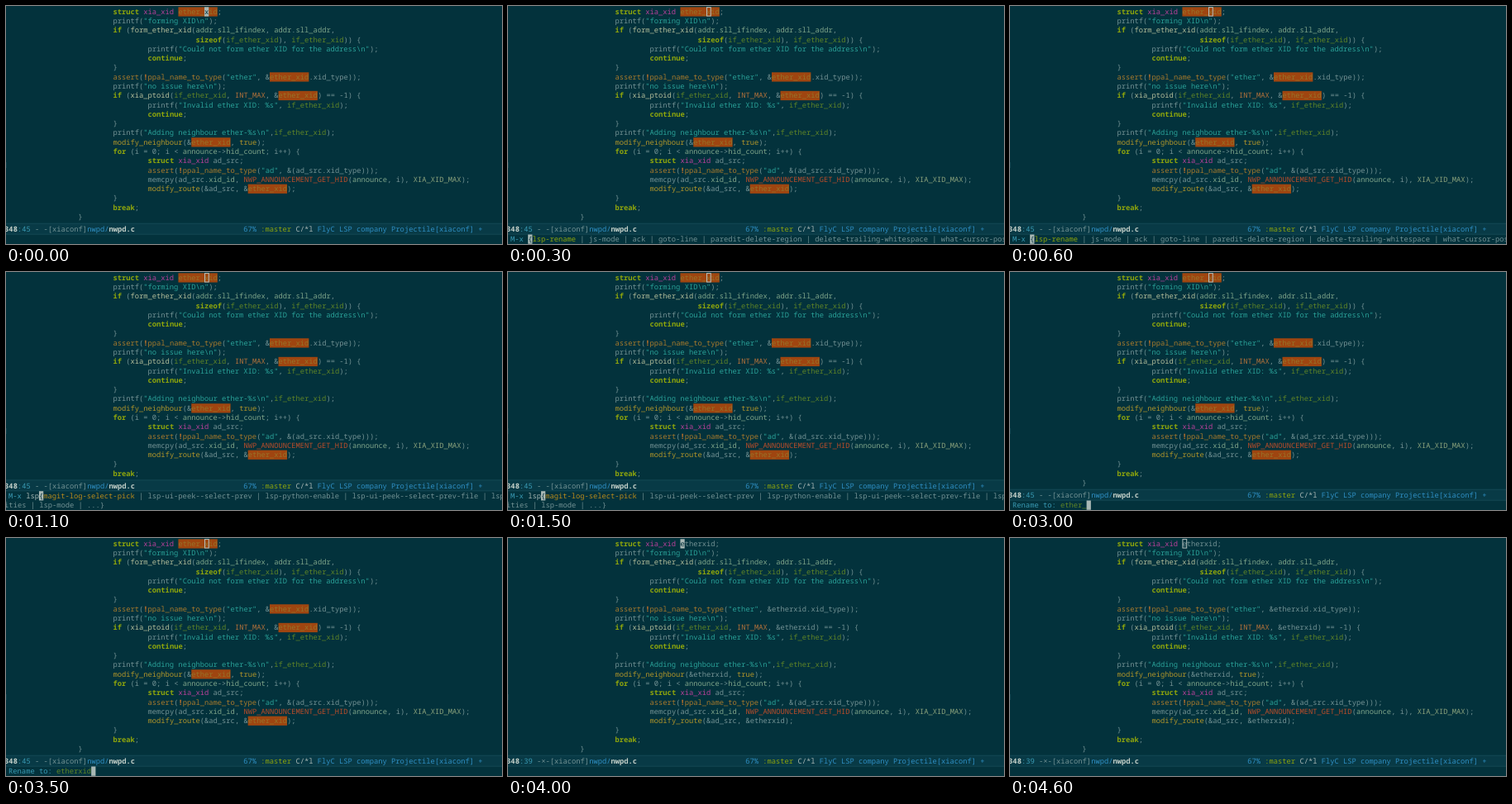
An HTML page for the animation above (4700 ms loop, 600 px wide and 288 px high).

```html
<!DOCTYPE html>
<html lang="en">
<head>
<meta charset="utf-8">
<title>Rename a symbol</title>
<style>
html, body { margin: 0; width: 100%; height: 100%; overflow: hidden; background: #03323c; }
svg { display: block; width: 600px; height: 288px; }
text {
  font: 8.77px "Noto Sans Mono", "DejaVu Sans Mono", monospace;
  text-rendering: geometricPrecision;
  white-space: pre;
  fill: #739294;
}
.key { fill: #8fa60c; font-weight: 700; }
.type { fill: #b8409a; }
.fn { fill: #b0952a; }
.check { fill: #a87a2c; }
.not { fill: #c8742a; font-weight: 700; }
.call { fill: #b4bd9a; }
.name { fill: #7fa58a; }
.str { fill: #2aa198; }
.arg { fill: #5f8427; }
.const { fill: #b3713a; }
.macro { fill: #bb4d2a; }
.limit { fill: #8ba27c; }
.mark { fill: #97742a; }
.hit { fill: #9f4510; }
.dark { fill: #03323c; }
.light { fill: #a9b8b5; }
.strong { fill: #c3cfc8; font-weight: 600; }
.blue { fill: #2f8fc4; }
.cyan { fill: #3a9bb4; }
.branch { fill: #8fa60c; }
.pick { fill: #b98a1c; }
.block { fill: #a9b8b5; }
.hollow { fill: none; stroke: #b5c2be; }
.bar { fill: #083a46; }
.rule { fill: #164a56; }
</style>
</head>
<body>
<svg id="stage" viewBox="0 0 600 288"></svg>
<script>
const CW = 5.265, LH = 11.28, LEFT = 3.1, EDGE = -1.9, TOP = 1.3, BASE = 8.5;
const LOOP = 4700;
const stage = document.getElementById("stage");

// Each entry: column, code
const code = [
  [24, "struct xia_xid ether_xid;"],
  [24, String.raw`printf("forming XID\n");`],
  [24, "if (form_ether_xid(addr.sll_ifindex, addr.sll_addr,"],
  [43, "sizeof(if_ether_xid), if_ether_xid)) {"],
  [32, String.raw`printf("Could not form ether XID for the address\n");`],
  [32, "continue;"],
  [24, "}"],
  [24, 'assert(!ppal_name_to_type("ether", &ether_xid.xid_type));'],
  [24, String.raw`printf("no issue here\n");`],
  [24, "if (xia_ptoid(if_ether_xid, INT_MAX, &ether_xid) == -1) {"],
  [32, 'printf("Invalid ether XID: %s", if_ether_xid);'],
  [32, "continue;"],
  [24, "}"],
  [24, String.raw`printf("Adding neighbour ether-%s\n",if_ether_xid);`],
  [24, "modify_neighbour(&ether_xid, true);"],
  [24, "for (i = 0; i < announce->hid_count; i++) {"],
  [32, "struct xia_xid ad_src;"],
  [32, 'assert(!ppal_name_to_type("ad", &(ad_src.xid_type)));'],
  [32, "memcpy(ad_src.xid_id, NWP_ANNOUNCEMENT_GET_HID(announce, i), XIA_XID_MAX);"],
  [32, "modify_route(&ad_src, &ether_xid);"],
  [24, "}"],
  [24, "break;"],
  [16, "}"]
];

const styles = {};
const style = (name, words) => words.split(" ").forEach(w => styles[w] = name);
style("key", "struct if sizeof continue for break");
style("type", "xia_xid");
style("fn", "modify_neighbour modify_route true");
style("check", "assert ppal_name_to_type");
style("not", "!");
style("call", "form_ether_xid xia_ptoid");
style("name", "addr sll_ifindex sll_addr announce hid_count xid_id");
style("arg", "if_ether_xid");
style("const", "INT_MAX");
style("macro", "NWP_ANNOUNCEMENT_GET_HID");
style("limit", "XIA_XID_MAX");
style("mark", "ether_xid");

const recent = "lsp-rename | js-mode | ack | goto-line | paredit-delete-region" +
  " | delete-trailing-whitespace | what-cursor-position";
const matches = "magit-log-select-pick | lsp-ui-peek--select-prev | lsp-python-enable" +
  " | lsp-ui-peek--select-prev-file | lsp-capabilities";

const command = (typed, list = recent, pick = "branch") => ({ prompt: "M-x ", typed, list, pick });
const rename = typed => ({ prompt: "Rename to: ", typed });

// Each entry: start in ms, state
const steps = [
  [0, {}],
  [300, command("")],
  [800, command("l")],
  [900, command("ls")],
  [1000, { ...command("lsp", matches, "pick"), rest: "ities | lsp-mode | ...}" }],
  [1600, rename("ether_xid")],
  [2600, rename("ether_xi")],
  [2800, rename("ether_x")],
  [2900, rename("ether_")],
  [3100, rename("ether")],
  [3200, rename("etherx")],
  [3300, rename("etherxi")],
  [3400, rename("etherxid")],
  [3600, { done: true }],
  [4600, { done: true, idle: true }]
];

const esc = s => s.replace(/&/g, "&amp;").replace(/</g, "&lt;").replace(/>/g, "&gt;");
const text = (x, y, s, cls = "") =>
  `<text x="${x.toFixed(2)}" y="${y.toFixed(2)}" class="${cls}">${esc(s)}</text>`;
const rect = (x, y, w, h, cls) =>
  `<rect x="${x}" y="${y}" width="${w}" height="${h}" class="${cls}"/>`;

// Draws [string, class] pairs one after another
function run(x, y, parts) {
  return parts.map(([s, cls]) => {
    const out = text(x, y, s, cls);
    x += s.length * CW;
    return out;
  }).join("");
}

function codeRow([col, source], row, done) {
  const top = TOP + row * LH;
  const x = LEFT + col * CW;
  const line = done ? source.replace(/\bether_xid\b/, "etherxid") : source;
  const parts = line.match(/"[^"]*"|\w+|!|[^\w"!]+/g).map(s => [s, s[0] === '"' ? "str" : styles[s]]);
  let at = x, boxes = "";
  for (const [s, cls] of parts) {
    if (cls === "mark") boxes += rect(at, top, s.length * CW, LH, "hit");
    at += s.length * CW;
  }
  return boxes + run(x, top + BASE, parts);
}

function cursor(x, top, char, solid) {
  return solid
    ? rect(x, top, CW, LH, "block") + text(x, top + BASE, char, "dark")
    : rect(x + .5, top + .3, CW - .5, LH - .8, "hollow");
}

function modeLine(y, done) {
  return rect(0, y, 600, 13.5, "bar") + rect(0, y, 600, .8, "rule") + rect(0, y + 13, 600, .8, "rule") +
    run(EDGE, y + 10, [
      ["348", "strong"], [done ? ":39 " : ":45 ", "cyan"], [done ? "-×-" : "- -", ""],
      ["[xiaconf]", ""], ["nwpd/", "blue"], ["nwpd.c", "strong"]
    ]) +
    run(287.2, y + 10, [
      ["67% ", "blue"], [":master ", "branch"], ["C/*l ", "light"],
      ["FlyC LSP company Projectile[xiaconf] +", "blue"]
    ]);
}

function miniBuffer({ prompt, typed, list, pick, rest }) {
  const top = rest ? 265.2 : 276.5;
  const x = LEFT + (prompt + typed).length * CW;
  let out = run(LEFT, top + BASE, [[prompt, "cyan"], [typed, list ? "light" : "arg"]]);
  out += cursor(x, top, list ? "{" : "", true);
  if (list) {
    const cut = list.indexOf(" ");
    out += run(x + CW, top + BASE, [[list.slice(0, cut), pick], [list.slice(cut), ""]]);
  }
  return rest ? out + text(EDGE, top + LH + BASE, rest) : out;
}

function draw(state) {
  const { prompt, rest, done, idle } = state;
  const rows = rest ? code.slice(0, -1) : code;
  const col = done ? 39 : 45;
  stage.innerHTML =
    rect(0, 189, .6, 7, "rule") +
    rows.map((line, i) => codeRow(line, i, done)).join("") +
    cursor(LEFT + col * CW, TOP, done ? "e" : "x", !prompt && !idle) +
    modeLine(rest ? 251.5 : 262.8, done) +
    (prompt ? miniBuffer(state) : "");
}

let shown;
function tick() {
  const t = performance.now() % LOOP;
  const step = steps.filter(([start]) => start <= t).pop();
  if (step !== shown) draw((shown = step)[1]);
  requestAnimationFrame(tick);
}
tick();
</script>
</body>
</html>
```
